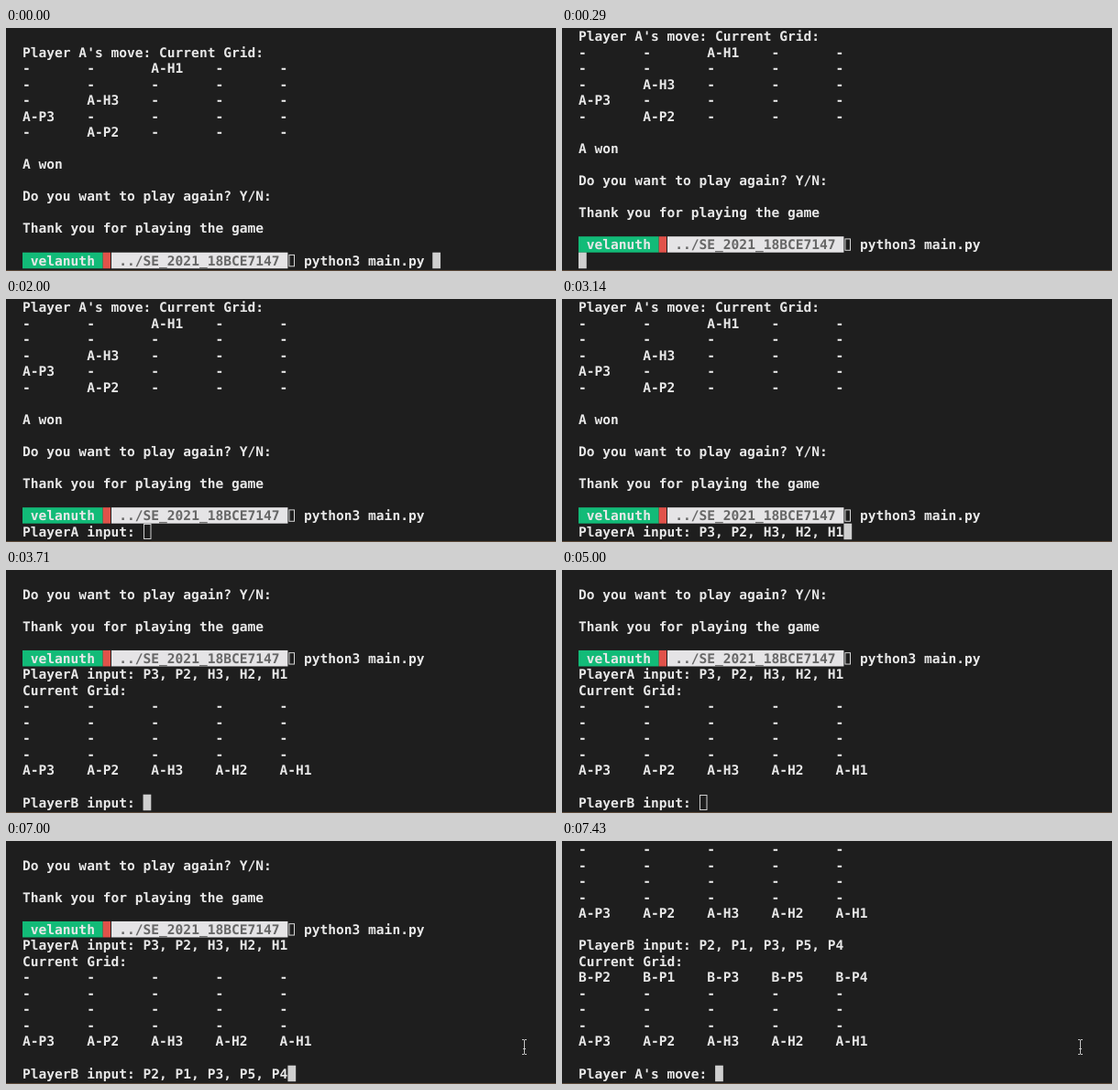
An HTML page that plays this animation: 600x266 px, repeating every 8000 ms.

```html
<!DOCTYPE html>
<html lang="en">
<head>
<meta charset="utf-8">
<title>Terminal game</title>
<style>
  html, body { margin: 0; width: 100%; height: 100%; overflow: hidden; background: #1e1e1e; }
  svg { display: block; width: 600px; height: 266px; }
  text {
    font: bold 14.57px "DejaVu Sans Mono", monospace;
    fill: #e8e8e8;
    white-space: pre;
    text-rendering: geometricPrecision;
  }
</style>
</head>
<body>
<svg viewBox="0 0 600 266">
  <rect width="600" height="266" fill="#1e1e1e"/>
  <g id="log"></g>
  <rect id="cursor"/>
  <path id="pointer" d="M563 .5h2l.5 .5.5-.5h2M565.5 1v15M563 16.5h2l.5-.5.5 .5h2M564 10.5h3" fill="none" stroke="#c4c4c4"/>
  <rect y="265" width="600" height="1" fill="#5a4838"/>
</svg>
<script>
const LOOP = 8000, LEFT = 18, TOP = 0.3, CELL = 8.77, ROW = 17.53, ROWS = 15;
const log = document.getElementById('log');
const cursor = document.getElementById('cursor');
const pointer = document.getElementById('pointer');

const colX = col => LEFT + col * CELL;
const rowY = row => TOP + row * ROW;
const gridRow = cells => cells.split(' ').map(c => c.padEnd(8)).join('').trimEnd();

const EMPTY = gridRow('- - - - -');
const HOME = gridRow('A-P3 A-P2 A-H3 A-H2 A-H1');
const PROMPT = 14, ASK_A = 15, ASK_B = 23, MOVE_A = 31;
const lines = [
  '',
  "Player A's move: Current Grid:",
  gridRow('- - A-H1 - -'),
  EMPTY,
  gridRow('- A-H3 - - -'),
  gridRow('A-P3 - - - -'),
  gridRow('- A-P2 - - -'),
  '',
  'A won',
  '',
  'Do you want to play again? Y/N:',
  '',
  'Thank you for playing the game',
  '',
  '',
  'PlayerA input: ',
  'Current Grid:',
  EMPTY, EMPTY, EMPTY, EMPTY,
  HOME,
  '',
  'PlayerB input: ',
  'Current Grid:',
  gridRow('B-P2 B-P1 B-P3 B-P5 B-P4'),
  EMPTY, EMPTY, EMPTY,
  HOME,
  '',
  "Player A's move: "
];
const answers = { [ASK_A]: 'P3, P2, H3, H2, H1', [ASK_B]: 'P2, P1, P3, P5, P4' };

// Each step: start time, last printed line, cursor column, input typed on that line, hollow cursor
const steps = [
  { at: 0, last: PROMPT, col: 51 },
  { at: 290, last: ASK_A, col: 0, blank: true },
  { at: 430, last: ASK_A, col: 15 },
  { at: 2000, last: ASK_A, col: 15, hollow: true },
  { at: 3000, last: ASK_A, col: 15 },
  { at: 3140, last: ASK_A, col: 33, typed: true },
  { at: 3710, last: ASK_B, col: 15 },
  { at: 5000, last: ASK_B, col: 15, hollow: true },
  { at: 6140, last: ASK_B, col: 15 },
  { at: 6290, last: ASK_B, col: 33, typed: true },
  { at: 7430, last: MOVE_A, col: 17 }
];

function add(name, attrs, content = '') {
  const node = document.createElementNS('http://www.w3.org/2000/svg', name);
  setAttrs(node, attrs);
  node.textContent = content;
  log.append(node);
}

function setAttrs(node, attrs) {
  for (const key in attrs) node.setAttribute(key, attrs[key]);
}

function write(content, col, row, color = '#e8e8e8') {
  add('text', { x: colX(col), y: rowY(row) + 13.8, style: `fill:${color}` }, content);
}

function block(from, to, row, fill) {
  add('rect', { x: from, y: rowY(row), width: to - from, height: ROW, fill });
}

function drawPrompt(row) {
  block(LEFT, colX(10), row, '#12bb78');
  block(colX(10), 114, row, '#e0524a');
  block(115, colX(33), row, '#e5e4e6');
  write('velanuth', 1, row);
  write('../SE_2021_18BCE7147', 12, row, '#666');
  add('rect', { x: 308.9, y: rowY(row) + 2.7, width: 5.6, height: 12.4, fill: 'none', stroke: '#d4d4d4' });
  write('python3 main.py', 35, row);
}

function drawLog({ last, blank, typed }) {
  log.replaceChildren();
  for (let row = 0; row < ROWS; row++) {
    const index = last - ROWS + 1 + row;
    if (index === PROMPT) drawPrompt(row);
    else if (index < last) write(lines[index] + (answers[index] || ''), 0, row);
    else if (!blank) write(lines[index] + (typed ? answers[index] : ''), 0, row);
  }
}

function drawCursor({ col, hollow }) {
  const x = colX(col), y = rowY(ROWS - 1);
  setAttrs(cursor, hollow
    ? { x: Math.round(x) + .5, y: 246.5, width: 7.5, height: 16, fill: 'none', stroke: '#cfcfcf' }
    : { x, y, width: CELL, height: ROW, fill: '#cfcfcf', stroke: 'none' });
}

let shown;
function render(time) {
  const step = steps.findLast(s => s.at <= time);
  if (step !== shown) {
    drawLog(step);
    drawCursor(step);
    shown = step;
  }
  pointer.setAttribute('visibility', time >= 6000 ? 'visible' : 'hidden');
  pointer.setAttribute('transform', `translate(0 ${time >= 6140 ? 217 : 216})`);
}

const start = performance.now();
function tick() {
  render((performance.now() - start) % LOOP);
  requestAnimationFrame(tick);
}
tick();
</script>
</body>
</html>
```
